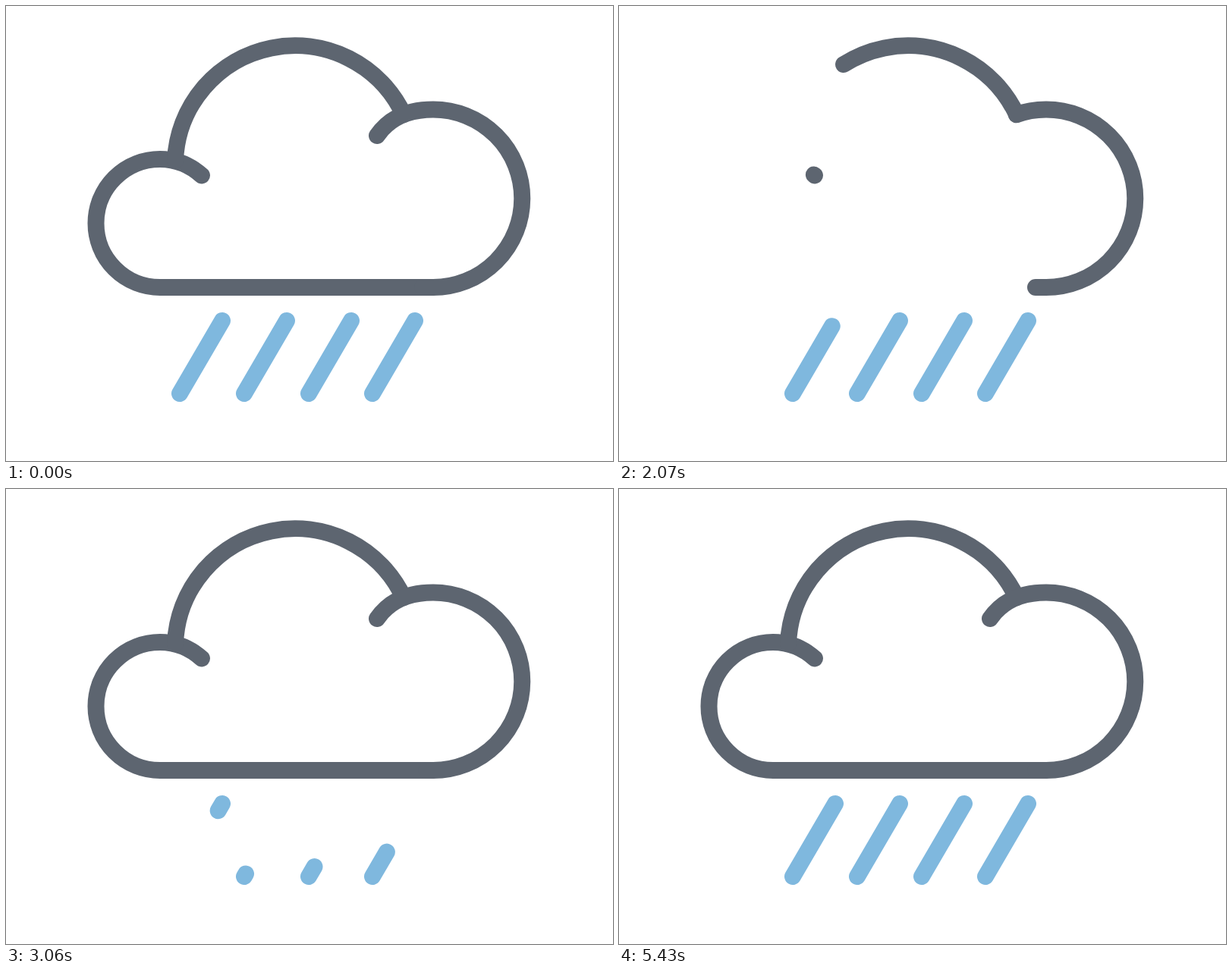
Write an HTML page that moves like this. It is 800x600 px and loops after 6330 ms.

```html
<!DOCTYPE html>
<html lang="en">
<head>
<meta charset="utf-8">
<title>Rain cloud</title>
<style>
  html, body { margin: 0; width: 100%; height: 100%; overflow: hidden; background: #fff; }
  svg { display: block; width: 100%; height: 100%; }

  path {
    fill: none;
    stroke: #5d6570;
    stroke-width: 22;
    stroke-linecap: round;
    stroke-dasharray: 1.01 3;
    animation: 6330ms linear infinite;
  }
  .left { animation-name: left; }
  .top { animation-name: top; }
  .right { animation-name: right; }
  .drop { stroke: #7fb8de; animation-name: drop; animation-delay: calc(var(--i) * 215ms); }

  /* Each stroke is wiped from its start, then drawn again from its start. */
  @keyframes left {
    0% { stroke-dashoffset: 0; }
    23.82% { stroke-dashoffset: 0; animation-timing-function: ease; }
    33.3% { stroke-dashoffset: -1; }
    33.31% { stroke-dashoffset: 1.015; animation-timing-function: ease; }
    41.8%, 100% { stroke-dashoffset: 0; }
  }
  @keyframes top {
    0% { stroke-dashoffset: 0; }
    31.5% { stroke-dashoffset: 0; animation-timing-function: ease; }
    36.81% { stroke-dashoffset: -1; }
    36.82% { stroke-dashoffset: 1.015; animation-timing-function: ease; }
    41.86%, 100% { stroke-dashoffset: 0; }
  }
  @keyframes right {
    0% { stroke-dashoffset: 0; }
    31.79% { stroke-dashoffset: 0; animation-timing-function: cubic-bezier(.263, .096, .273, .933); }
    40.14% { stroke-dashoffset: -.996; }
    40.15% { stroke-dashoffset: 1.015; animation-timing-function: ease; }
    50.25%, 100% { stroke-dashoffset: 0; }
  }
  @keyframes drop {
    0% { stroke-dashoffset: 0; opacity: 1; }
    31.14% { stroke-dashoffset: 0; opacity: 1; animation-timing-function: cubic-bezier(.278, .093, .302, .866); }
    46.05% { stroke-dashoffset: -.98; opacity: 1; }
    46.4% { stroke-dashoffset: -.98; opacity: 0; }
    46.55% { stroke-dashoffset: -.98; opacity: 0; }
    46.56% { stroke-dashoffset: 1.015; opacity: 1; animation-timing-function: cubic-bezier(.3, .1, .2, 1); }
    62.04%, 100% { stroke-dashoffset: 0; opacity: 1; }
  }
</style>
</head>
<body>
<svg viewBox="0 0 800 600">
  <path class="left" pathLength="1" d="M561 371H203A84.5 84.5 0 0 1 203 202Q234 202 258 223.5"/>
  <path class="top" pathLength="1" d="M223 204A158.1 158.1 0 0 1 524 143"/>
  <path class="right" pathLength="1" d="M489 171C504 149 529 136.5 563 136.5A117.25 117.25 0 0 1 563 371H549"/>
  <path class="drop" style="--i:0" pathLength="1" d="M285 415L229 511"/>
  <path class="drop" style="--i:1" pathLength="1" d="M370 415L314 511"/>
  <path class="drop" style="--i:2" pathLength="1" d="M455 415L399 511"/>
  <path class="drop" style="--i:3" pathLength="1" d="M539 415L483 511"/>
</svg>
</body>
</html>
```
